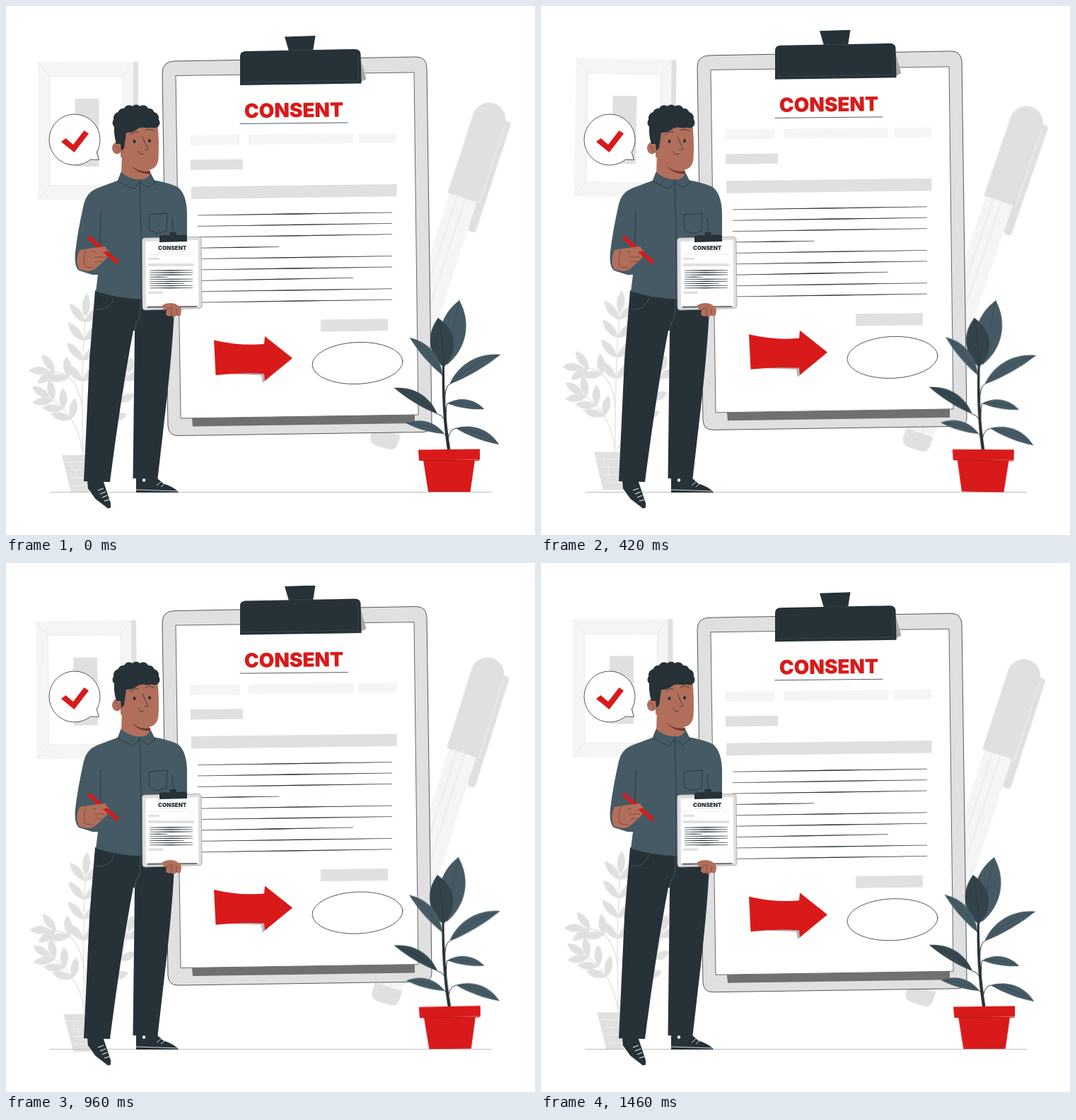
Animation, 748 px wide and 748 px high, one loop 1500 ms. Source, as an HTML page:

```html
<!DOCTYPE html>
<html lang="en">
<head>
<meta charset="utf-8">
<title>Consent</title>
<style>
html, body { margin: 0; width: 100%; height: 100%; overflow: hidden; background: #fff; }
svg { display: block; width: 100vw; height: 100vh; }
text { font-family: Inter, "Open Sans", sans-serif; font-weight: 900; text-anchor: middle; }
#back { transform-origin: 374px 384px; }
#plant { transform-origin: 623px 551px; }
#bubble { transform-origin: 97px 189px; }
.ink, .crease { fill: none; stroke: #263238; stroke-width: .8; stroke-linecap: round; stroke-linejoin: round; }
.crease { stroke: #7b4034; }
.skin { fill: #b16f5b; }
.dark { fill: #263238; }
.red { fill: #d91a1a; }
</style>
</head>
<body>
<svg viewBox="0 0 748 748">
  <g id="back">
    <path d="M179 79H187V274H179Z" fill="#e0e0e0"/>
    <path d="M45 79H180V274H45Z" fill="#f5f5f5"/>
    <path d="M62 99.500H165V254H62Z" fill="#fff" stroke="#e6e6e6" stroke-width=".8"/>
    <path d="M45 79L62 99.500M180 79L165 99.500M45 274L62 254M180 274L165 254" stroke="#e4e4e4" stroke-width=".8"/>
    <path d="M97.500 131H131.500V227H97.500Z" fill="#e0e0e0"/>
    <g id="shrub"></g>
    <path d="M79 635H135L123 688H92Z" fill="#e0e0e0"/>
    <path d="M81 645H130M93 645V656M89 656H128M100 656V667M91 667H126M94 678H124" stroke="#f0f0f0"/>
    <g transform="translate(683 160) rotate(18.100)">
      <rect x="20" y="-5" width="11.500" height="164" rx="4" fill="#e0e0e0"/>
      <path d="M-20 116H20V474H-20Z" fill="#f5f5f5"/>
      <path d="M-9 118V465M3 118V465" stroke="#e4e4e4"/>
      <path d="M-20 464H20V476Q20 488 8 488H-8Q-20 488 -20 476Z" fill="#e0e0e0"/>
      <path d="M-23.500 117V0A23.500 23.500 0 0 1 23.500 0V117Z" fill="#e0e0e0"/>
      <path d="M24 0V117" stroke="#f2f2f2"/>
    </g>
  </g>

  <path d="M62 687.500H687" stroke="#bcc0c2"/>

  <g id="board">
    <path d="M238 78L580 72Q594 72 595 87L602 590Q602 602 590 602.500L244 607.500Q230 608 229 594L221 95Q221 78.500 238 78Z" fill="#e0e0e0" stroke="#263238" stroke-width=".8"/>
    <path d="M240 98.500L577 94L583 578L247 583Z" fill="#fff" stroke="#263238" stroke-width=".7"/>
    <path d="M263 583L578 578V590L264 594.500Z" fill="#707070"/>
    <path d="M500 70L509.500 103.500L502 107Z" fill="#a8a8a8"/>
    <path class="dark" d="M394 43.500L437.500 42L434 64H400Z"/>
    <path class="dark" d="M331 71Q331 64.500 338 64L493 61Q501 61 501.500 68L502.500 109.500L331 112Z"/>
    <path d="M400 62.500H434M335 108L498 105.500V69" fill="none" stroke="#3d4c54" stroke-width=".7"/>
    <text class="red" x="407" y="157.300" font-size="27.900" transform="rotate(-.7 407 147)">CONSENT</text>
    <g id="page"></g>
    <path class="ink" d="M331 166.500L483 165"/>
    <path d="M304 520Q335 521 361 522L363 533L371 526L365 516Z" fill="#b3b3b3"/>
    <path class="red" d="M294 472.500Q330 481 365 478L366 467L405 498L366 530L365 520Q330 518 296.500 522Z"/>
    <ellipse class="ink" cx="497" cy="505" rx="64" ry="29.500" transform="rotate(-2.500 497 505)"/>
  </g>

  <g id="man">
    <path class="dark" d="M115 671L137 670L148 703V709.500L143 710.500L126 697L116 683Z"/>
    <path d="M116 683L126 697L143 710M130 685L138 682M133 690L141 687M136 695L143 692M139 700L146 698" stroke="#fff" fill="none"/>
    <path class="dark" d="M184 667H213L222 675Q240 681 244 688H184Z"/>
    <path d="M184 684Q215 685 242 686M213 678L219 673M219 680L225 675" stroke="#fff" stroke-width=".8" fill="none"/>
    <path class="dark" d="M126 402L200 413L238 428Q236 475 228 550L214.500 668H179.500L182 459H180L176 480Q160 570 147 673L110 672L118 500Z"/>
    <circle cx="195" cy="670.500" r="2.200" fill="#fff"/>
    <path d="M126 429Q148 431 153 412M190 414V433Q189 443 184 449M182 459L184 447" fill="none" stroke="#455a64" stroke-width=".9"/>

    <path class="skin" d="M164 205L163 240Q180 258 204 240L202 228Z"/>
    <path d="M176 224Q188 237 204 233V237Q187 239 176 224Z" fill="#6f362c"/>
    <path class="skin" d="M162 168L214 164Q217 190 215.500 216Q214 231 200 232Q178 231 162 213Z"/>
    <ellipse class="skin" cx="157" cy="201" rx="7" ry="8.500"/>
    <path class="crease" d="M154 198Q160 199 159 206"/>
    <path class="dark" d="M154 160Q151 180 156 195H162L163 205L167 201L170 179Q181 180 190 170Q202 176 213 168L212 152L180 144Z"/>
    <g id="curls" class="dark"></g>
    <path class="ink" d="M176 182Q180 177 187 178M197 176Q204 172 210 177M193 185Q197 195 201 202Q199 204 196 203M187 205Q189 212 195 209"/>
    <ellipse class="dark" cx="181.500" cy="191.500" rx="2" ry="2.500"/>
    <ellipse class="dark" cx="203" cy="190.500" rx="2" ry="2.500"/>

    <path d="M160 246L128 258Q114 264 110 280Q101 320 98 348Q96 368 103 374L122 380H130L127 404Q160 415 195 415L256 400V295Q256 268 244 257Q235 251 208 246L188 245Z" fill="#455a64"/>
    <path d="M163 235L158 248L181 259L189 248L200 257L211 250L204 236Q202 244 190 246Q172 244 163 235Z" fill="#455a64"/>
    <path class="ink" d="M163 235L158 248L181 259L189 248L200 257L211 250L204 236M189 248Q192 330 191 414M134 292L133 340M235 300L237 324M203 295L228 293L227 318L214 322L203 317ZM127 404Q160 414 192 415"/>
    <path class="skin" d="M104 345Q121 342 131 341L144 345Q148 350 141 358L129 369Q120 379 103 372Q97 359 104 345Z"/>
    <path class="crease" d="M113 345Q108 358 112 369L124 370M122 347L140 349M125 355H140M126 362L136 361"/>
    <path d="M116.500 327L158.500 363" stroke="#d91a1a" stroke-width="5.500"/>
    <path class="skin" d="M126 342L140 340L144 346L132 350Q126 349 126 342Z"/>

    <path d="M196 328L272 326.500Q276 326.500 276 331L277 424Q277 427.500 273 427.500L197 430Q193 430 193 426L192.500 332Q192.500 328 196 328Z" fill="#dedede" stroke="#9a9fa2" stroke-width=".8"/>
    <path d="M197.500 333L271.500 331L272.500 424L198 425Z" fill="#fff"/>
    <path d="M200 424.500L270 424V426L200 427Z" fill="#737373"/>
    <path class="dark" d="M231 320H241L240 325H232ZM219 324.500L254 323.500Q256 323.500 256 326V333L217 334V326Q217 324.500 219 324.500Z"/>
    <text class="dark" x="235.200" y="345" font-size="8">CONSENT</text>
    <path d="M215 347.500H256" stroke="#c8cccd" stroke-width=".5"/>
    <path d="M201 350H216V352H201ZM220 350H253V352H220ZM255 350H266V352H255Z" fill="#f5f5f5"/>
    <path d="M201 356H217V359H201ZM201 364H266V368H201ZM201 403.500H222V407H201Z" fill="#e0e0e0"/>
    <g id="mini"></g>
    <path class="skin" d="M221 423Q229 418 239 421Q248 425 248 431L247 437Q244 440 241 437Q238 442 233 438Q229 440 226 436L227 430Q221 430 221 423Z"/>
    <path class="crease" d="M227 430Q232 426 236 427M234 429L234 438M241 429V437"/>
  </g>

  <g id="bubble">
    <circle cx="97" cy="189" r="36" fill="#fff" stroke="#263238" stroke-width=".8"/>
    <path d="M127 206L128.300 207L131.500 217.500L119.800 217L117 216Z" fill="#fff"/>
    <path class="ink" d="M128.300 207L131.500 217.500L119.800 217"/>
    <path class="red" d="M78 192L84.500 187L95 196L110.500 176L117 180.500L96.500 207Z"/>
  </g>

  <g id="plant">
    <g id="leaves"></g>
    <path class="red" d="M583 627.500L670 626.500V641.500L584 642.500ZM590 642H663L656.500 687H597Z"/>
    <path d="M585 642.500H669" stroke="#b51515" stroke-width=".9"/>
  </g>
</svg>
<script>
const pale = '#e0e0e0', faint = '#f5f5f5', mid = '#455a64', deep = '#37474f', dark = '#263238';
const $ = id => document.getElementById(id);
const fill = (d, color) => `<path d="${d}" fill="${color}"/>`;
const line = (d, color, w = 1) => `<path d="${d}" fill="none" stroke="${color}" stroke-width="${w}"/>`;
const repeat = (n, draw) => Array.from({ length: n }, (_, i) => draw(i)).join('');

// Leaf from base to tip: w is the side bulge, bend curves the whole blade.
function leaf(bx, by, tx, ty, w, color, bend = 0, vein) {
  const dx = tx - bx, dy = ty - by, len = Math.hypot(dx, dy);
  const at = (k, o) => `${bx + dx * k - dy / len * o} ${by + dy * k + dx / len * o}`;
  const side = o => `${at(.3, o)} ${at(.7, o)}`;
  const edge = `M${bx} ${by}C${side(bend + w)} ${tx} ${ty}C${at(.7, bend - w)} ${at(.3, bend - w)} ${bx} ${by}Z`;
  return fill(edge, color) + (vein ? line(`M${bx} ${by}C${side(bend)} ${tx} ${ty}`, vein, .7) : '');
}

// Curved twig with pairs of leaves along its outer half and one at the end.
function sprig(x0, y0, cx, cy, x1, y1, pairs, size = 30) {
  const mix = (a, b, c, t) => a * (1 - t) ** 2 + 2 * b * t * (1 - t) + c * t * t;
  const slope = (a, b, c, t) => (b - a) * (1 - t) + (c - b) * t;
  const blade = (t, turn) => {
    const x = mix(x0, cx, x1, t), y = mix(y0, cy, y1, t);
    const a = Math.atan2(slope(y0, cy, y1, t), slope(x0, cx, x1, t)) + turn;
    return leaf(x, y, x + size * Math.cos(a), y + size * Math.sin(a), 7.5, pale);
  };
  return line(`M${x0} ${y0}Q${cx} ${cy} ${x1} ${y1}`, pale, 1.3) + blade(1, 0) +
    repeat(pairs, i => {
      const t = 1 - .62 * (i + .3) / pairs;
      return blade(t, -.75) + blade(t, .75);
    });
}
$('shrub').innerHTML =
  sprig(109, 636, 106, 520, 112, 440, 4, 34) +
  sprig(108, 570, 102, 517, 62, 516, 2) +
  sprig(108, 630, 102, 580, 62, 554, 3) +
  sprig(110, 630, 152, 600, 172, 520, 3, 24);

// Blocks and ruled lines on the page, all tilted slightly upwards.
const block = (x, y, w, h, color) =>
  fill(`M${x} ${y}l${w} ${-w * .0125}v${h}L${x} ${y + h}Z`, color);
const rule = (x, y, w, rise, thick) =>
  fill(`M${x} ${y}l${w * .5} ${-rise * .5 - thick}L${x + w} ${y - rise}l${-w * .5} ${rise * .5 + thick}Z`, dark) +
  line(`M${x} ${y}l${w} ${-rise}`, dark, thick);
const rows = (left, top, gap, width, rise, thick) => repeat(9, i =>
  rule(left, top + i * gap, width * (i === 3 ? .42 : i === 6 ? .8 : 1), i === 3 ? rise * .42 : rise, thick));

$('page').innerHTML =
  block(260, 183, 70, 14, faint) + block(343, 182, 148, 14, faint) + block(499, 180.5, 53, 13.5, faint) +
  block(261, 217.5, 74, 14.5, pale) + block(262, 255.5, 290.5, 17.5, pale) + block(445, 443.5, 95, 17, pale) +
  rows(271, 296, 15.4, 275, 4, .65);
$('mini').innerHTML = rows(203, 374, 3.1, 61, .3, .6);

$('curls').innerHTML = repeat(9, i => {
  const a = Math.PI * (1 + i / 8);
  return `<circle cx="${184 + 26 * Math.cos(a)}" cy="${165 + 18 * Math.sin(a)}" r="${7.5 + i % 2 * .6}"/>`;
}) + '<ellipse cx="182" cy="159" rx="24" ry="14"/>';

// Side leaves droop outwards; each hangs on a short stalk from the stem.
const branch = (bx, by, tx, ty, color = mid) => {
  const len = Math.hypot(tx - bx, ty - by), side = Math.sign(bx - tx);
  const root = 619 + (by - 510) * .06;
  return line(`M${bx} ${by}Q${root} ${by + 2} ${root} ${by + 26}`, dark) +
    leaf(bx, by, tx, ty, 3 + len * .1, color, side * len * .085, color === mid ? deep : dark);
};
$('leaves').innerHTML =
  leaf(624, 507, 641, 416, 24, mid, -1, deep) +
  fill('M624 628Q615 570 617 500L620 500Q619 570 628.500 628Z', dark) +
  leaf(619, 511, 611, 441, 22, '#34434b', 2, dark) +
  branch(617, 522, 571, 469) + branch(627, 535, 699, 493) +
  branch(610, 577, 549, 540, deep) + branch(624, 562, 676, 570) +
  branch(636, 597, 697, 620) + branch(620, 605, 566, 590);

// Motions are functions of the loop phase p, sampled evenly into keyframes.
const LOOP = 1500, STEPS = 60;
const wave = p => 1 - 4 * Math.abs((p + .25) % 1 - .5);
const play = (id, pose) => $(id).animate(
  Array.from({ length: STEPS + 1 }, (_, i) => ({ transform: pose(i / STEPS) })),
  { duration: LOOP, iterations: Infinity, easing: 'linear' });

const sway = p => `rotate(${wave(p)}deg)`;
const lift = p => `translateY(${-7.25 * (1 + wave(p + .75))}px)`;
const beat = p => {
  const pulse = p < .56 ? .096 * Math.exp(-2.8 * p) * Math.sin(Math.PI * p / .28) ** 2 : 0;
  return `scale(${1 + pulse})`;
};

play('back', sway);
play('plant', sway);
play('board', lift);
play('bubble', beat);
</script>
</body>
</html>
```
